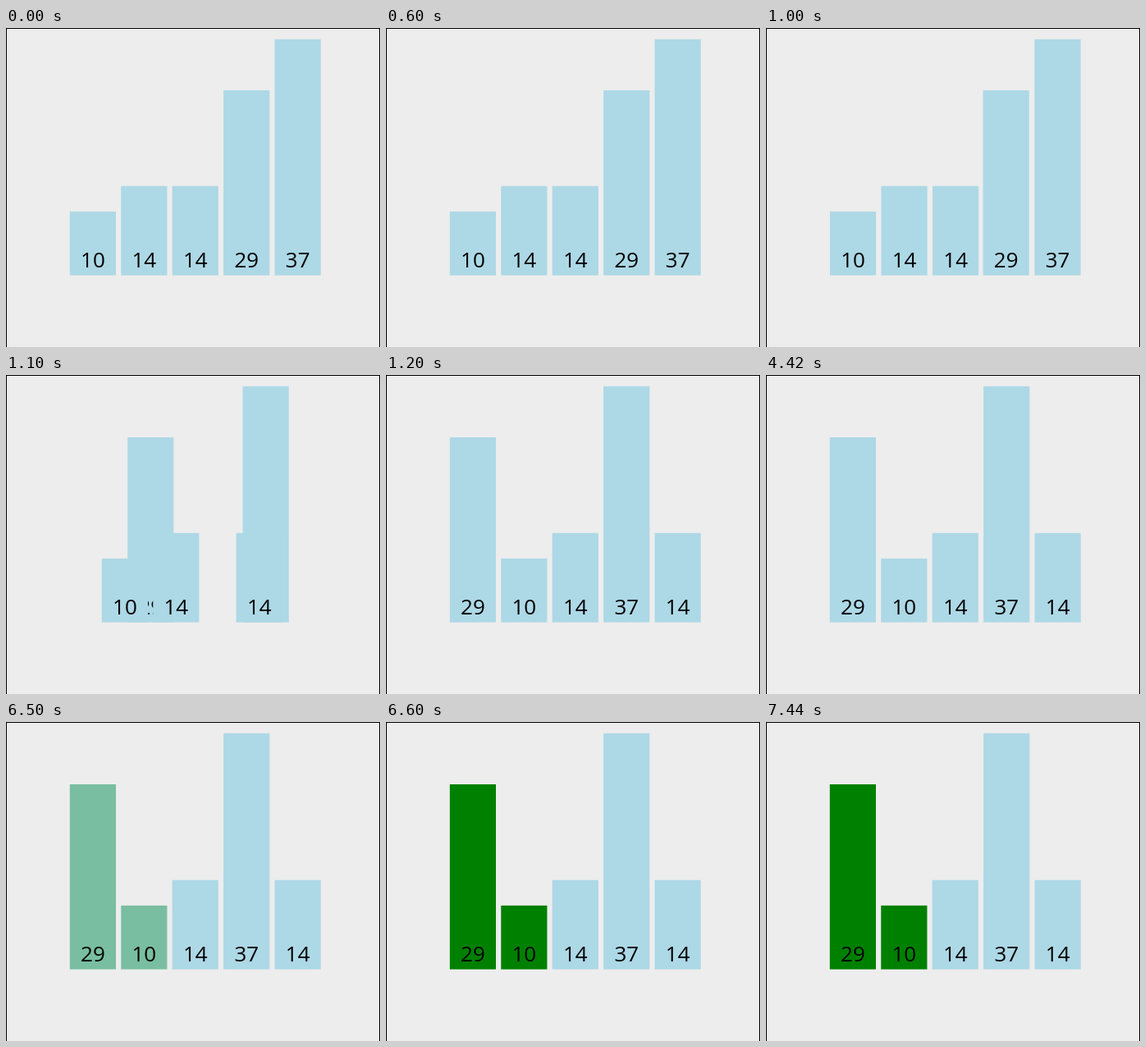
Animation of 456 by 389 pixels, one loop 8000 ms. Source, as an HTML page with a canvas:

```html
<!DOCTYPE html>
<html lang="en">
<head>
<meta charset="utf-8">
<title>Bar shuffle</title>
<style>
  html, body { margin: 0; width: 100%; height: 100%; overflow: hidden; background: #ededed; }
  canvas { display: block; }
</style>
</head>
<body>
<canvas id="stage" width="456" height="389"></canvas>
<script>
const ctx = document.getElementById("stage").getContext("2d");

const LOOP = 8000;
const STEP = 100; // the motion is sampled ten times a second
const LEFT = 77.8, PITCH = 62.45, BAR_W = 56.2;
const BASE = 301.6, UNIT = 7.78;
const BLUE = [173, 216, 230], GREEN = [0, 128, 0];

// Listed back to front; from and to are slot numbers.
const bars = [
  { value: 37, from: 4, to: 3 },
  { value: 29, from: 3, to: 0, marked: true },
  { value: 14, from: 2, to: 4 },
  { value: 14, from: 1, to: 2 },
  { value: 10, from: 0, to: 1, marked: true }
];

const mix = (a, b, k) => a + (b - a) * k;
const easeInOut = k => k < 0.5 ? 4 * k ** 3 : 1 - 4 * (1 - k) ** 3;
const progress = (t, start, length) =>
  easeInOut(Math.min(1, Math.max(0, (t - start) / length)));

function drawBar(bar, move, tint) {
  const x = LEFT + PITCH * mix(bar.from, bar.to, move);
  const height = bar.value * UNIT;
  const rgb = BLUE.map((c, i) => Math.round(mix(c, GREEN[i], bar.marked ? tint : 0)));
  ctx.fillStyle = `rgb(${rgb})`;
  ctx.fillRect(x, BASE - height, BAR_W, height);
  ctx.fillStyle = "#000";
  ctx.fillText(bar.value, x + BAR_W / 2, 292);
}

function draw(t) {
  ctx.fillStyle = "#ededed";
  ctx.fillRect(0, 0, 456, 389);
  ctx.font = '26px "Open Sans", "Noto Sans", sans-serif';
  ctx.textAlign = "center";

  const move = progress(t, 980, 220);
  const tint = progress(t, 6420, 190);
  for (const bar of bars) drawBar(bar, move, tint);

  // Frame, open at the bottom
  ctx.fillStyle = "#000";
  ctx.fillRect(0, 0, 456, 1);
  ctx.fillRect(0, 0, 1, 389);
  ctx.fillRect(455, 0, 1, 389);
}

const began = performance.now();
function tick() {
  const t = (performance.now() - began) % LOOP;
  draw(Math.floor(t / STEP) * STEP);
  requestAnimationFrame(tick);
}
tick();
</script>
</body>
</html>
```
